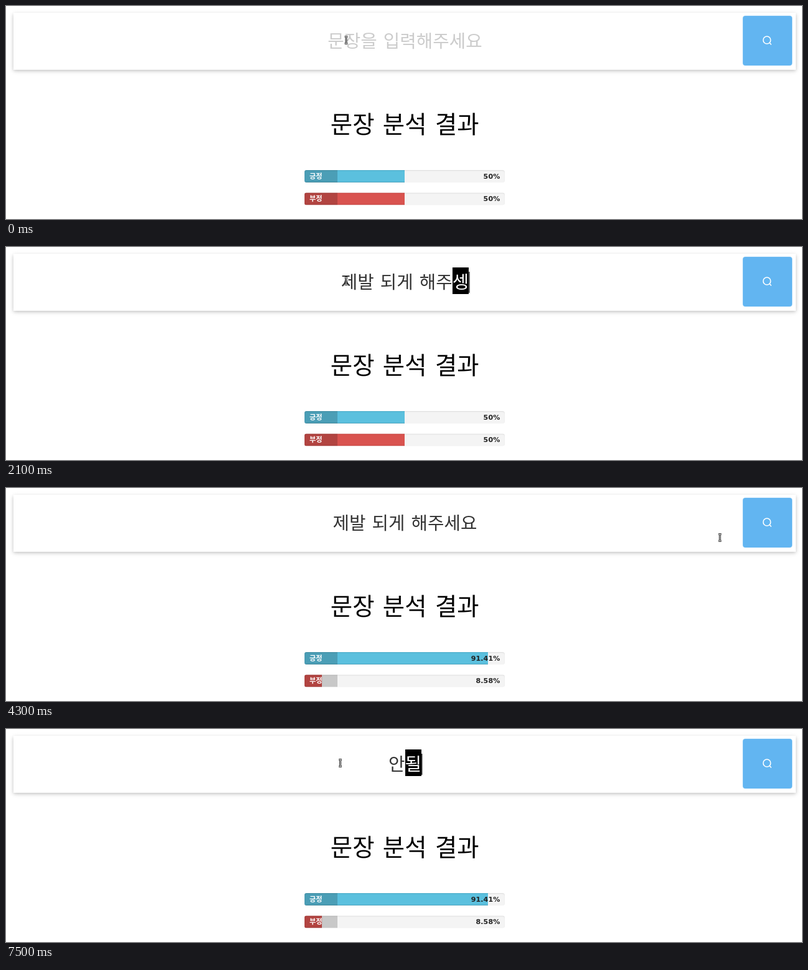
These frames come from a looping animation (1280x344 px, 8 s). An HTML page:

```html
<!DOCTYPE html>
<html lang="ko">
<head>
<meta charset="utf-8">
<title>문장 분석</title>
<style>
  html, body { margin: 0; width: 100%; height: 100%; overflow: hidden; background: #fff; }
  #stage { position: relative; width: 1280px; height: 344px; overflow: hidden; }
  #stage > * { position: absolute; }
  .card {
    left: 12px; top: 11px; width: 1258px; height: 92px; background: #fff;
    box-shadow: 0 1.6px 5px rgba(0,0,0,.15), 0 1.6px 8px rgba(0,0,0,.12);
  }
  .button {
    left: 1185px; top: 16px; width: 79px; height: 80px; border-radius: 4px;
    background: #62b5f1; box-shadow: 0 0 0 .8px rgba(98,181,241,.3);
  }
  .track {
    left: 480px; width: 322.4px; height: 20px; border-radius: 3.2px; overflow: hidden;
    background: #f4f4f4;
  }
  .track * { position: absolute; left: 0; top: 0; height: 100%; }
  .bar { box-shadow: inset 0 -1px 0 rgba(0,0,0,.15); }
  .label { width: 53px; background: rgba(0,0,0,.18); }
  .rim { width: 100%; border-radius: 3.2px; box-shadow: inset 0 1px 2px rgba(0,0,0,.1); }
  svg { left: 0; top: 0; }
  text { font-family: "Noto Sans CJK KR", "Noto Sans KR", "Noto Sans CJK", sans-serif; white-space: pre; }
  .entry, .title { word-spacing: calc(var(--gap, 0) * 1em); }
  .entry { font-size: 28.8px; }
  .title { font-size: 38.4px; }
  .name, .value { font-size: 11.2px; font-weight: 700; }
  .name { fill: #fff; }
  .value { font-family: "DejaVu Sans", sans-serif; fill: #222; text-anchor: end; }
</style>
</head>
<body>
<div id="stage">
  <div class="card"></div>
  <div class="button"></div>
  <div class="track" style="top:265px">
    <div class="bar" id="goodBar" style="background:#5bc0de"></div><div class="label"></div><div class="rim"></div>
  </div>
  <div class="track" style="top:301px; transform:translateY(.4px)">
    <div class="bar" id="badBar" style="background:#d9534f"></div><div class="label"></div><div class="rim"></div>
  </div>
  <svg width="1280" height="344" viewBox="0 0 1280 344">
    <g fill="none" stroke="#fff" stroke-width="1.6" stroke-linecap="round">
      <circle cx="1223.6" cy="55" r="6"/>
      <path d="M1228 59.5l2.2 2.5"/>
    </g>
    <text class="title" x="641.2" y="205" text-anchor="middle">문장 분석 결과</text>
    <text class="name" x="488" y="279">긍정</text>
    <text class="name" x="488" y="315.4">부정</text>
    <text class="value" id="goodText" x="794.4" y="279"></text>
    <text class="value" id="badText" x="794.4" y="315.4"></text>

    <rect id="mark" y="33" height="43"/>
    <text class="entry" id="plain" y="67"></text>
    <text class="entry" id="marked" y="67" fill="#fff"></text>
    <rect id="caret" y="40" width="1.5" height="34" fill="#333"/>

    <g id="beam" fill="none" stroke-linejoin="round">
      <path d="M-2.3-5.7h4.6M-2.3 5.7h4.6M0-5.7v11.4" stroke="#000" stroke-width="2.8"/>
      <path d="M-2.3-5.7h4.6M-2.3 5.7h4.6M0-5.7v11.4" stroke="#fff" stroke-width="1"/>
    </g>
    <g id="hand" fill="#fff" stroke="#000" stroke-width="1.2" stroke-linejoin="round">
      <path d="M-3.2-5.4c0-1.4 2-1.4 2 0v4l5 .9c1.6.3 2.4 1 2.4 2.4l-.6 4.6h-8c-.8-1.6-2.6-3-3.6-4.8-.5-1.2.9-1.8 1.8-1l1 .8z"/>
      <path d="M-.8 2.6v1.6M1.4 2.6v1.6M3.6 2.6v1.6" stroke-width=".6"/>
    </g>
  </svg>
</div>
<script>
const LOOP = 8000, TICK = 100;
const CENTER = 641.5, FONT_SIZE = 28.8, SYLLABLE = .92 * FONT_SIZE, SPACE = .349 * FONT_SIZE;
const PLACEHOLDER = '문장을 입력해주세요';
const SENTENCE = '제발 되게 해주세요';
const CLICK = 3600, BLUR_CARET = 3000, RETYPE = 6800;

// [time, text]; the last syllable is being composed unless a space follows
const typing = [
  [300, 'ㅈ'], [400, '제'], [500, '젭'], [800, '제바'],
  [1000, '제발'], [1100, '제발 '], [1200, '제발 되'], [1300, '제발 됙'], [1400, '제발 되게'],
  [1600, '제발 되게 '], [1700, '제발 되게 ㅎ'], [1800, '제발 되게 해'],
  [2000, '제발 되게 해주'], [2100, '제발 되게 해주셍'], [2500, SENTENCE],
  [RETYPE, 'ㅇ'], [6900, '아'], [7000, '안'], [7100, '안ㄷ'], [7200, '안도'],
  [7400, '안되'], [7500, '안될']
];

// [time, x, y]
const pointer = [
  [0, 547, 55], [2700, 547, 55], [2800, 554.5, 52], [2900, 554.5, 52],
  [3000, 850, 17], [3100, 1160.5, 82.5], [3200, 1194, 86], [3300, 1208, 88],
  [4000, 1208, 88], [4200, 1196, 84], [4300, 1148, 80], [4400, 908, 79],
  [4500, 836.5, 73], [4600, 836.5, 73], [4700, 775, 63], [4800, 757, 57],
  [5100, 630, 55], [5300, 537.5, 55], [LOOP, 537.5, 55]
];

const el = id => document.getElementById(id);
const set = (node, attrs) => { for (const k in attrs) node.setAttribute(k, attrs[k]); };
const show = (node, on) => set(node, { visibility: on ? 'visible' : 'hidden' });
const width = s => [...s].reduce((w, c) => w + (c === ' ' ? SPACE : SYLLABLE), 0);

// widen or narrow the font's own space to the wanted one
function fitSpaces() {
  const node = el('plain');
  const measure = s => { node.textContent = s; return node.getComputedTextLength(); };
  const natural = measure('가 가') - measure('가가');
  el('stage').style.setProperty('--gap', (SPACE - natural) / FONT_SIZE);
}

function pointerAt(t) {
  const i = Math.max(1, pointer.findIndex(p => p[0] >= t));
  const [t0, x0, y0] = pointer[i - 1], [t1, x1, y1] = pointer[i];
  const k = (t - t0) / (t1 - t0);
  return [x0 + (x1 - x0) * k, y0 + (y1 - y0) * k];
}

// cubic-bezier(.25, .1, .25, 1)
function ease(p) {
  if (p <= 0) return 0;
  if (p >= 1) return 1;
  const curve = (a, b, u) => 3 * a * u * (1 - u) ** 2 + 3 * b * u * u * (1 - u) + u ** 3;
  let lo = 0, hi = 1;
  for (let i = 0; i < 20; i++) {
    const mid = (lo + hi) / 2;
    if (curve(.25, .25, mid) < p) lo = mid; else hi = mid;
  }
  return curve(.1, 1, lo);
}

function drawEntry(t, pointerX) {
  const step = typing.filter(s => s[0] <= t).pop();
  const text = step ? step[1] : PLACEHOLDER;
  const left = CENTER - width(text) / 2, right = CENTER + width(text) / 2;
  const composing = step && (t < CLICK || t >= RETYPE);
  const dragging = t >= 4800 && t < RETYPE;

  let cut = text.length;
  if (composing && !text.endsWith(' ')) cut--;
  if (dragging) {
    while (cut > 0 && left + width(text.slice(0, cut)) - width(text[cut - 1]) / 2 > pointerX) cut--;
  }
  const head = text.slice(0, cut), tail = text.slice(cut);
  const split = left + width(head);
  const markLeft = Math.round(split);

  el('plain').textContent = head;
  el('marked').textContent = tail;
  set(el('plain'), { x: left, fill: step ? '#333' : '#ccc' });
  set(el('marked'), { x: split });
  set(el('mark'), {
    x: markLeft, width: tail ? Math.round(right) - markLeft : 0,
    fill: dragging ? '#ee8457' : '#000'
  });
  set(el('caret'), { x: right });
  show(el('caret'), composing && (t < BLUR_CARET || t >= RETYPE));
}

function drawPointer(t, x, y) {
  const isHand = t >= 3100 && t < 4300;
  set(el(isHand ? 'hand' : 'beam'), { transform: `translate(${x} ${y})` });
  show(el('hand'), isHand);
  show(el('beam'), !isHand);
}

function drawBars(t) {
  const k = ease((t - CLICK + 50) / 600), done = t >= CLICK;
  el('goodBar').style.width = 50 + 41.41 * k + '%';
  el('badBar').style.width = 50 - 41.42 * k + '%';
  el('goodText').textContent = done ? '91.41%' : '50%';
  el('badText').textContent = done ? '8.58%' : '50%';
}

function draw(time) {
  const t = Math.floor(time % LOOP / TICK) * TICK;
  const [x, y] = pointerAt(t);
  drawEntry(t, x);
  drawPointer(t, x, y);
  drawBars(t);
}

let start;
function frame(now) {
  start ??= now;
  draw(now - start);
  requestAnimationFrame(frame);
}
fitSpaces();
draw(0);
requestAnimationFrame(frame);
</script>
</body>
</html>
```
